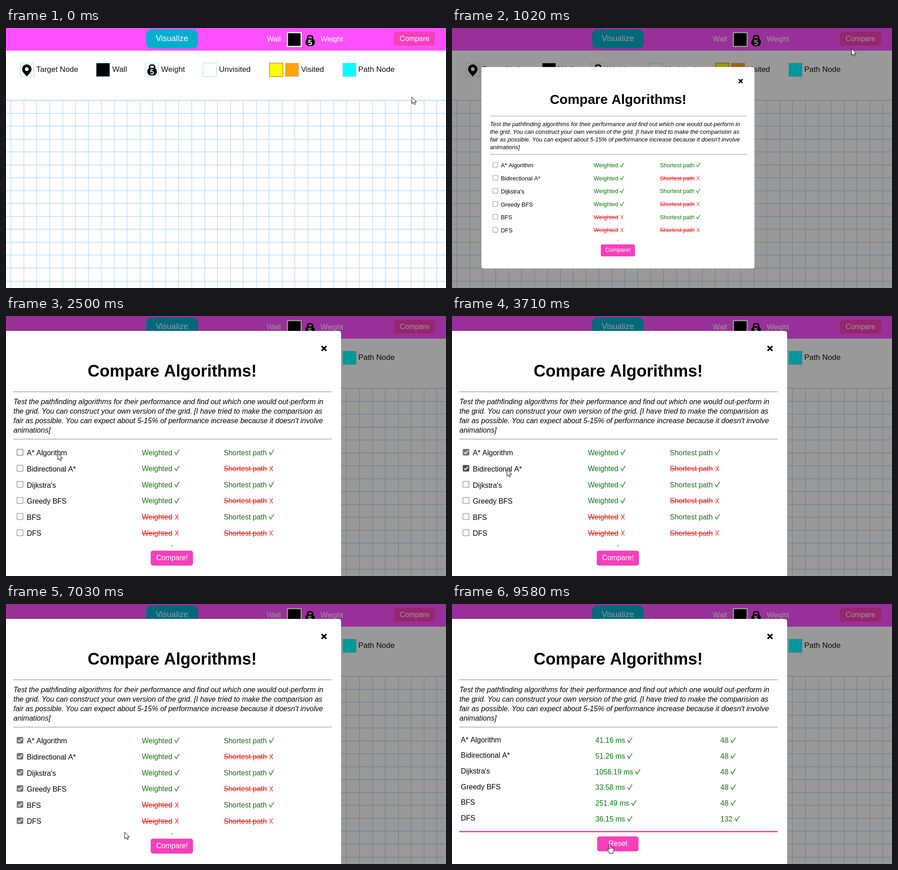
These frames come from a looping animation (973x575 px, 9.86 s). An HTML page with a canvas:

```html
<!DOCTYPE html>
<html lang="en">
<head>
<meta charset="utf-8">
<title>Compare Algorithms</title>
<style>
  html, body { margin: 0; width: 100%; height: 100%; overflow: hidden; background: #fff; }
  canvas { display: block; }
</style>
</head>
<body>
<canvas id="stage" width="973" height="575"></canvas>
<script>
const ctx = document.getElementById('stage').getContext('2d');
const LOOP = 9860, STEP = 90;
const MODAL_AT = 840, RESULT_AT = 9120;
const FACE = '"Liberation Sans", Arial, sans-serif';
const PINK = '#f73fbb', GRID = '#afd8f8', GREEN = '#0b750b', RED = '#f01414';

// name, weighted, shortest path, time checked, run time, path length
const ROWS = [
  ['A* Algorithm', true, true, 2600, '41.16 ms', '48'],
  ['Bidirectional A*', true, false, 3430, '51.26 ms', '48'],
  ["Dijkstra's", true, true, 4170, '1056.19 ms', '48'],
  ['Greedy BFS', true, false, 5010, '33.58 ms', '48'],
  ['BFS', false, true, 5920, '251.49 ms', '48'],
  ['DFS', false, false, 6650, '36.15 ms', '132']
];
const INTRO = [
  'Test the pathfinding algorithms for their performance and find out which one would out-perform in',
  'the grid. You can construct your own version of the grid. [I have tried to make the comparision as',
  "fair as possible. You can expect about 5-15% of performance increase because it doesn't involve",
  'animations]'
];
// pointer path: time, x, y
const PATH = [
  [-60, 897, 152], [30, 896, 144], [300, 895, 70], [480, 908, 16], [570, 903, 25], [750, 903, 25],
  [1200, 869, 58], [1740, 412, 294], [2190, 115, 311], [2370, 115, 311], [2460, 114, 303],
  [2820, 114, 301], [3180, 131, 331], [3540, 131, 331], [3930, 88, 367], [4440, 88, 367],
  [4770, 102, 417], [5070, 102, 417], [5610, 58, 431], [6000, 58, 431], [6330, 64, 483],
  [6570, 64, 483], [6960, 262, 504], [7290, 338, 530], [7560, 349, 531]
];
// progress line while the algorithms run: time, width
const PROGRESS = [[0, 2], [8070, 8], [8150, 14], [8450, 26], [8540, 36], [8740, 70], [8920, 110]];

function text(str, x, y, color = '#000', size = 16, style = '', align = 'left') {
  ctx.font = `${style} ${size}px ${FACE}`;
  ctx.textAlign = align;
  ctx.fillStyle = color;
  ctx.fillText(str, x, y);
  return ctx.measureText(str).width;
}

function rect(x, y, w, h, color) {
  ctx.fillStyle = color;
  ctx.fillRect(x, y, w, h);
}

function rounded(x, y, w, h, r, color) {
  ctx.beginPath();
  ctx.roundRect(x, y, w, h, r);
  ctx.fillStyle = color;
  ctx.fill();
}

function stroke(points, color, width) {
  ctx.beginPath();
  points.forEach(([x, y]) => ctx.lineTo(x, y));
  ctx.strokeStyle = color;
  ctx.lineWidth = width;
  ctx.stroke();
}

function box(x, fill, border = GRID) {
  rect(x, 77, 31, 31, border);
  rect(x + 1, 78, 29, 29, fill);
}

function kettlebell(x, y) {
  ctx.beginPath();
  ctx.roundRect(x + 5, y + 2, 11, 12, 3.5);
  ctx.strokeStyle = '#000';
  ctx.lineWidth = 3.2;
  ctx.stroke();
  rounded(x, y + 8, 21, 17, 8, '#000');
  text('5', x + 10.5, y + 22.5, '#fff', 16, 'bold', 'center');
}

function pin(x, y) {
  ctx.fillStyle = '#000';
  ctx.beginPath();
  ctx.arc(x, y, 10.5, Math.PI * 0.87, Math.PI * 0.13);
  ctx.quadraticCurveTo(x + 7, y + 9, x, y + 16);
  ctx.quadraticCurveTo(x - 7, y + 9, x - 10, y + 4);
  ctx.fill();
  ctx.beginPath();
  ctx.arc(x, y, 4.2, 0, 7);
  ctx.fillStyle = '#fff';
  ctx.fill();
}

function page() {
  rect(0, 0, 973, 575, '#fff');
  rect(0, 0, 973, 50, '#ff50ff');
  rounded(310, 3, 114.5, 42, 11, '#00aecd');
  text('Visualize', 367, 29, '#fff', 18, '', 'center');
  text('Wall', 577, 30, '#fff');
  rect(621, 9, 33, 33, '#fff');
  rect(623.5, 11.5, 28, 28, '#000');
  kettlebell(662, 15);
  text('Weight', 696, 30, '#fff');
  rounded(858, 8, 91, 31, 5, '#f73fbb');
  text('Compare', 903.5, 29, '#fff', 16, '', 'center');

  box(31, '#fff');
  pin(46, 91);
  box(199, '#000');
  box(307, '#fff');
  kettlebell(312.5, 80);
  box(435, '#fff');
  box(582, '#ff0', '#d0453c');
  box(617, 'orange');
  box(744, '#0ff');
  [['Target Node', 67], ['Wall', 235], ['Weight', 343], ['Unvisited', 471],
   ['Visited', 652.5], ['Path Node', 779]].forEach(([s, x]) => text(s, x, 97, '#111', 17));

  for (let x = 10.4; x < 973; x += 28.54) rect(Math.round(x), 160, 1.2, 415, GRID);
  for (let y = 160; y < 575; y += 28.54) rect(0, Math.round(y) - 0.6, 973, 1.3, GRID);
  rect(0, 159, 973, 1, GRID);
}

function mark(ok, x, y) {
  if (ok) {
    stroke([[x, y - 5], [x + 2, y - 5.6], [x + 4, y - 0.5], [x + 11, y - 12]], GREEN, 1.3);
  } else {
    stroke([[x + 2, y - 11], [x + 9, y]], RED, 1.2);
    stroke([[x + 9, y - 11.5], [x + 2, y]], RED, 1.2);
  }
}

function feature(label, ok, x, y) {
  const w = text(label, x, y, ok ? GREEN : RED);
  if (!ok) rect(x, y - 5.5, w, 1.2, RED);
  mark(ok, x + w + 4.5, y);
}

function checkbox(x, y, checked, hover) {
  const color = hover ? '#4f4f4f' : '#767676';
  rounded(x, y, 14.5, 14.5, 2.5, color);
  if (checked) stroke([[x + 3, y + 7.5], [x + 6, y + 10.5], [x + 11.7, y + 3.8]], '#fff', 2);
  else rounded(x + 1, y + 1, 12.5, 12.5, 1.8, '#fff');
}

function button(label, x, y, w) {
  rounded(x, y, w, 33, 5, PINK);
  text(label, 367, y + 21, '#fff', 16, '', 'center');
}

function choices(t, pointer) {
  ROWS.forEach(([name, weighted, shortest, checkedAt], i) => {
    const y = 307.5 + 35.6 * i;
    const hover = pointer.x < 150 && Math.abs(pointer.y - y + 4) < 16;
    checkbox(23.7, y - 13.6, t >= checkedAt, hover);
    text(name, 46, y + 0.8);
    feature('Weighted', weighted, 300.5, y);
    feature('Shortest path', shortest, 481.5, y);
  });
  const width = PROGRESS.findLast(p => t >= p[0])[1];
  rect(367 - width / 2, 507, width, 2.5, '#f7386f');
  button('Compare!', 320, 519, 93.5);
}

function results(t) {
  ROWS.forEach(([name, , , , time, length], i) => {
    const y = 305.5 + 34.7 * i;
    text(name, 19.5, y);
    [[time, 317], [length, 593.5]].forEach(([s, x]) => {
      mark(true, x + text(s, x, y + 1.8, GREEN) + 4.5, y + 1.8);
    });
  });
  const k = Math.min(1, (t - RESULT_AT) / 460);
  const width = 110 + 594 * (1 - (1 - k) ** 2);
  rect(368 - width / 2, 502, width, 2.6, '#f7386f');
  button('Reset', 321, 514, 91.5);
}

function modal(t, tick, pointer) {
  rect(0, 0, 973, 575, 'rgba(0,0,0,.4)');
  if (t >= 1200) {
    ctx.beginPath();
    ctx.moveTo(902, 39);
    ctx.lineTo(912, 39);
    ctx.lineTo(908, 43.5);
    ctx.fillStyle = '#bd3074';
    ctx.fill();
  }
  const u = Math.min(1, (tick - 814) / 488);
  const scale = 1 - (1 - u) ** 3;
  ctx.save();
  ctx.translate(367, 309);
  ctx.scale(scale, scale);
  ctx.translate(-367, -309);
  rounded(-7, 33, 748, 552, 5, '#fff');
  stroke([[698, 66.5], [708.5, 77]], '#000', 3.4);
  stroke([[708.5, 66.5], [698, 77]], '#000', 3.4);
  text('Compare Algorithms!', 367.5, 134, '#000', 36.6, 'bold', 'center');
  rect(16, 167, 704, 1.2, '#929292');
  INTRO.forEach((line, i) => text(line, 16.5, 195.3 + 21 * i, '#000', 16, 'italic'));
  rect(16, 271.7, 704, 1.2, '#929292');
  if (t < RESULT_AT) choices(t, pointer);
  else results(t);
  ctx.restore();
}

function pointerAt(tick) {
  const i = PATH.findIndex(p => p[0] > tick);
  if (i < 0) return { x: 349, y: 531 };
  const [t0, x0, y0] = PATH[Math.max(0, i - 1)], [t1, x1, y1] = PATH[i];
  const k = (tick - t0) / (t1 - t0);
  return { x: x0 + (x1 - x0) * k, y: y0 + (y1 - y0) * k };
}

const ARROW = new Path2D('M.5 .5V15.5L4 12.3L6.2 17.3L8.6 16.2L6.4 11.4H10.8Z');
const HAND = new Path2D('M-1.5 1Q0-1 1.5 1V7Q3 5.5 4.5 7.5Q6 6.5 7 8Q9.5 7.5 9 10.5V15L7 18V20.5H-1.5V18L-5 12.5Q-6 10-4 10L-1.5 12.5Z');

function drawPointer({ x, y }, hand) {
  ctx.save();
  ctx.translate(Math.round(x), Math.round(y));
  const shape = hand ? HAND : ARROW;
  ctx.fillStyle = '#fff';
  ctx.fill(shape);
  ctx.strokeStyle = '#000';
  ctx.lineWidth = 1;
  ctx.stroke(shape);
  if (hand) [1.5, 4.5, 7].forEach(fx => stroke([[fx, 7.5], [fx, 11]], '#000', 0.9));
  ctx.restore();
}

function frame(now) {
  const t = now % LOOP;
  const tick = t < 80 ? -60 : Math.floor((t - 30) / STEP) * STEP + 30;
  const pointer = pointerAt(tick);
  const open = t >= MODAL_AT;
  page();
  if (open) modal(t, tick, pointer);
  const hand = open ? pointer.x > 320 && pointer.x < 413 && pointer.y > 514
                    : pointer.y > 8 && pointer.y < 39;
  drawPointer(pointer, hand);
  requestAnimationFrame(frame);
}
requestAnimationFrame(frame);
</script>
</body>
</html>
```
